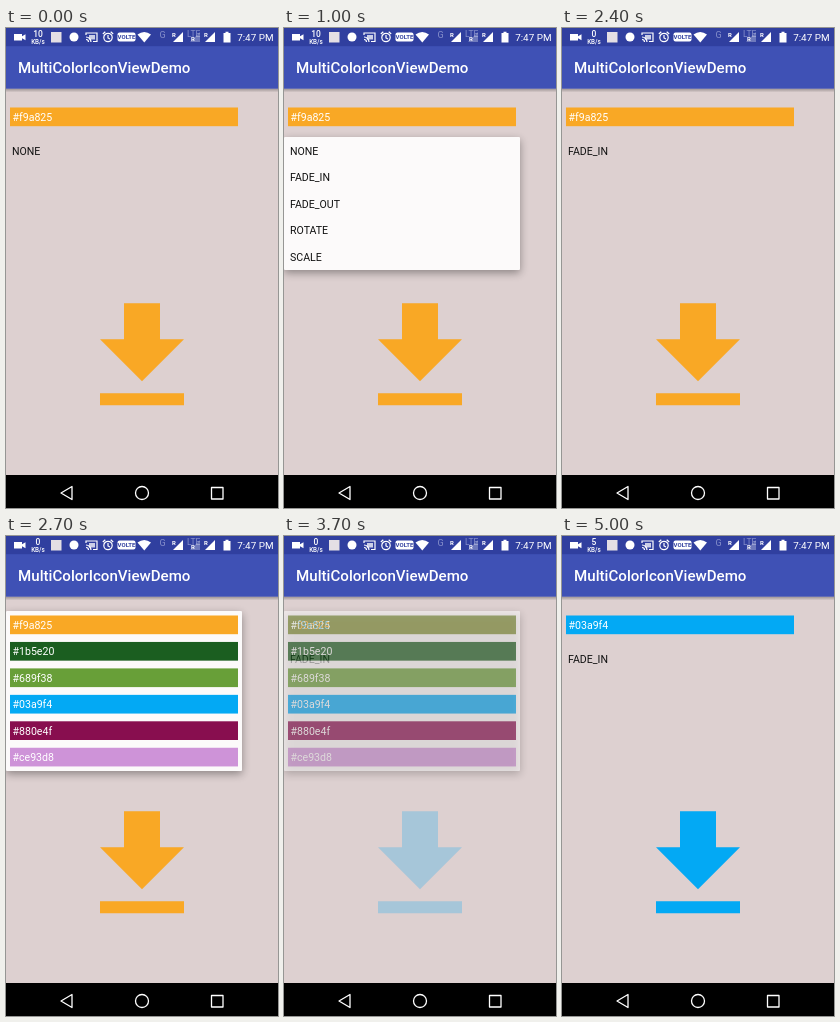
Write an HTML page that moves like this. It is 272x480 px and loops after 5.1 s.

```html
<!DOCTYPE html>
<html lang="en">
<head>
<meta charset="utf-8">
<title>MultiColorIconViewDemo</title>
<style>
  html, body { margin: 0; width: 100%; height: 100%; overflow: hidden; background: #ddd0d0; }
  svg { display: block; width: 272px; height: 480px; font-family: Roboto, sans-serif; }
  .item { font-size: 10.58px; }
</style>
</head>
<body>
<svg viewBox="0 0 272 480">
  <defs>
    <linearGradient id="fall" x2="0" y2="1">
      <stop offset="0" stop-opacity=".3"/>
      <stop offset="1" stop-opacity="0"/>
    </linearGradient>
    <filter id="blur" x="-20%" y="-40%" width="140%" height="180%"><feGaussianBlur stdDeviation="4"/></filter>
    <clipPath id="clip"><rect id="clipBox"/></clipPath>
  </defs>

  <rect width="272" height="480" fill="#ddd0d0"/>
  <rect y="60.5" width="272" height="4" fill="url(#fall)"/>
  <rect width="272" height="60.7" fill="#3f51b5"/>
  <rect width="272" height="18.2" fill="#303f9f"/>
  <text x="12.1" y="45.2" font-size="15.1" font-weight="500" fill="#fff">MultiColorIconViewDemo</text>

  <!-- status bar -->
  <g fill="#fff">
    <path d="M8 6h8v2.2l3.5-2v6l-3.5-2v2.300h-8z"/>
    <g text-anchor="middle" font-weight="500">
      <text id="rate" x="32" y="9.300" font-size="8.5"/>
      <text x="32" y="16" font-size="6.300">KB/s</text>
    </g>
    <rect x="45" y="4" width="10.500" height="10.500" fill="#e4dfe4"/>
    <circle cx="68" cy="9" r="4.500"/>
    <g fill="none" stroke="#fff" stroke-width="1.200">
      <path d="M80 7V5h11v8.500h-4M80 9a5 5 0 0 1 5 5M80 11.500a2.500 2.500 0 0 1 2.500 2.500"/>
      <circle cx="102" cy="9.500" r="4.200"/>
      <path d="M102 7v3l2 1M96.800 6l2.500-2.200M107.200 6l-2.500-2.200"/>
    </g>
    <rect x="83" y="7" width="6" height="4.500" opacity=".75"/>
    <rect x="111.500" y="4.500" width="18" height="9" rx="2"/>
    <text x="120.500" y="11.300" font-size="6" font-weight="700" text-anchor="middle" fill="#303f9f">VOLTE</text>
    <path d="M131.500 6.500Q138.300 1.500 145 6.500L138.300 14.500z"/>
    <g fill="#8790cb">
      <text x="153.500" y="10" font-size="9">G</text>
      <text x="181" y="9" font-size="8.500">LTE</text>
    </g>
    <g font-size="6" font-weight="700">
      <text x="166" y="9">R</text>
      <text x="185" y="13">R</text>
      <text x="198" y="9">R</text>
    </g>
    <path d="M177 4v10h-10z"/>
    <path d="M194 4v10h-10z" opacity=".3"/>
    <path d="M209 4v10h-10z"/>
    <path d="M217.500 5h2v-1.200h3v1.200h2v9.500h-7z"/>
    <text x="267.500" y="12.800" font-size="9.900" text-anchor="end">7:47 PM</text>
  </g>

  <!-- current choices -->
  <rect id="bar" x="4" y="79.500" width="228" height="18.700"/>
  <text id="code" class="item" x="6.500" y="92.900" fill="#fff"/>
  <text id="mode" class="item" x="6" y="127" fill="#111"/>
  <path id="icon" transform="translate(64 257.300) scale(6)" d="M19 9h-4V3H9v6H5l7 7zM5 18v2h14v-2z"/>

  <!-- dropdown -->
  <rect id="shade" filter="url(#blur)"/>
  <g id="pop">
    <rect id="sheet" rx="1" fill="#fcfafa"/>
    <g clip-path="url(#clip)">
      <g id="modes"></g>
      <g id="colors"></g>
    </g>
  </g>

  <!-- navigation bar -->
  <rect y="447" width="272" height="33"/>
  <g fill="none" stroke="#fff" stroke-width="1.300" stroke-linejoin="round">
    <path d="M55 465l11-6.500v13z"/>
    <circle cx="136" cy="465" r="6.500"/>
    <rect x="205.500" y="459.500" width="11.500" height="11.500"/>
  </g>
</svg>
<script>
const LOOP = 5100, STEP = 100, PITCH = 26.45;
const COLORS = ['#f9a825', '#1b5e20', '#689f38', '#03a9f4', '#880e4f', '#ce93d8'];
const MODES = ['NONE', 'FADE_IN', 'FADE_OUT', 'ROTATE', 'SCALE'];
// Each list grows out of its anchor row, then fades away after a choice.
const POPUPS = [
  { list: 'modes', open: 405, close: 1610, mid: 175.5, half: 66.5, rise: 52 },
  { list: 'colors', open: 2405, close: 3610, mid: 155, half: 80, rise: 66 }
];
const $ = id => document.getElementById(id);
const clamp = v => Math.max(0, Math.min(1, v));

function add(parent, tag, attrs, text = '') {
  const el = document.createElementNS('http://www.w3.org/2000/svg', tag);
  set(el, attrs);
  el.textContent = text;
  return parent.appendChild(el);
}

function set(el, attrs) {
  for (const k in attrs) el.setAttribute(k, attrs[k]);
}

const press = add($('modes'), 'g', {});
add(press, 'rect', { y: 136, width: 236, height: 26.5, opacity: .02 });
add(press, 'rect', { y: 136, width: 122, height: 26.5, opacity: .06 });
MODES.forEach((name, i) =>
  add($('modes'), 'text', { class: 'item', x: 6, y: 127 + i * PITCH, fill: '#111' }, name));
COLORS.forEach((c, i) => {
  const y = 79.5 + i * PITCH;
  add($('colors'), 'rect', { x: 4, y, width: 228, height: 18.7, fill: c });
  add($('colors'), 'text', { class: 'item', x: 6.5, y: y + 13.4, fill: '#fff' }, c);
});

function drawPopup(t) {
  const p = POPUPS.find(p => t >= p.open && t < p.close + 220);
  const show = p ? 'inline' : 'none';
  set($('pop'), { display: show });
  set($('shade'), { display: show });
  if (!p) return;

  const x = clamp((t - p.open) / 250);
  const q = (1 - x) ** 2;
  const alpha = clamp(x / .35) * clamp(1 - (t - p.close) / 220);
  const half = p.half - (p.rise + .5) * q;
  const box = { x: 13 * q, y: p.mid - p.rise * q - half, width: 236, height: 2 * half };

  set($('sheet'), box);
  set($('clipBox'), box);
  set($('shade'), { ...box, y: box.y + 3, opacity: .36 * alpha });
  set($('pop'), { opacity: alpha });
  for (const o of POPUPS) set($(o.list), {
    display: o === p ? 'inline' : 'none',
    transform: `translate(${13 * q} ${-p.rise * q})`
  });
  set(press, { display: t >= 1500 ? 'inline' : 'none' });
}

function draw(t) {
  const color = COLORS[t < 3600 ? 0 : 3];
  const fadeStart = t < 3600 ? 1750 : 3600;
  const fade = t < 1750 ? 1 : clamp((t - fadeStart) / 400);
  $('rate').textContent = t < 1200 ? 10 : t < 2200 ? 2 : t < 4700 ? 0 : 5;
  $('code').textContent = color;
  $('mode').textContent = MODES[t < 1600 ? 0 : 1];
  set($('bar'), { fill: color });
  set($('icon'), { fill: color, opacity: fade });
  drawPopup(t);
}

const start = performance.now();
function tick() {
  const t = (performance.now() - start) % LOOP;
  draw(Math.floor(t / STEP) * STEP);
  requestAnimationFrame(tick);
}
tick();
</script>
</body>
</html>
```
